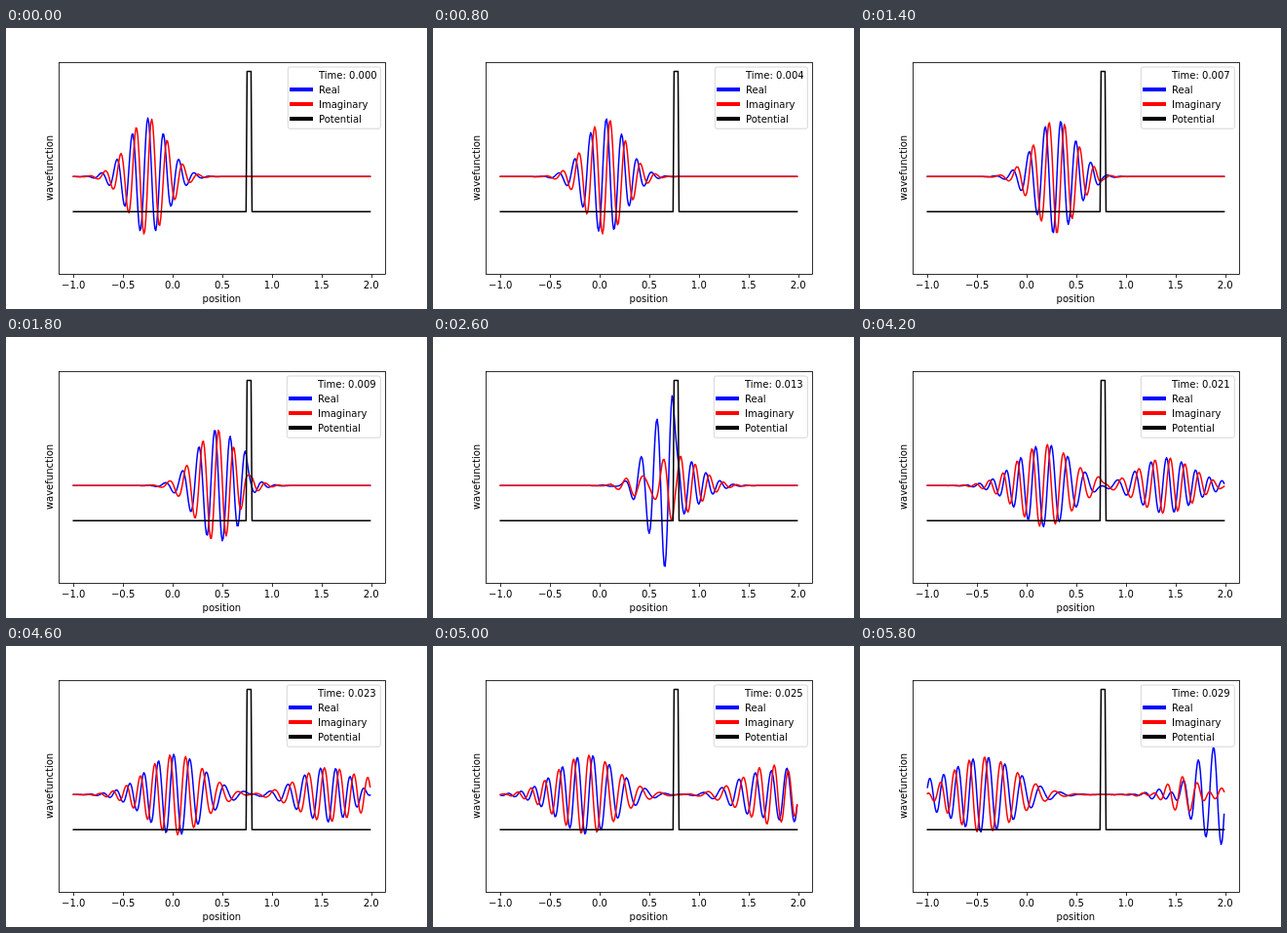
An HTML page that plays this animation: 432x288 px, repeating every 6000 ms.

```html
<!DOCTYPE html>
<html lang="en">
<head>
<meta charset="utf-8">
<title>Wave packet at a barrier</title>
<style>
  html, body { margin: 0; width: 100%; height: 100%; overflow: hidden; background: #fff; }
  svg { display: block; width: 432px; height: 288px; }
  text { font: 10px "DejaVu Sans", sans-serif; fill: #000; }
  .mid { text-anchor: middle; }
  .curve { fill: none; stroke-width: 1.5; stroke-linejoin: round; stroke-linecap: square; }
  .axis { fill: none; stroke: #000; stroke-width: .8; }
  .key { stroke-width: 4; stroke-linecap: square; }
  .blue { stroke: #00f; }
  .red { stroke: #f00; }
  .black { stroke: #000; }
</style>
</head>
<body>
<svg viewBox="0 0 432 288">
  <path class="axis" id="ticks"/>
  <g id="labels"></g>
  <text class="mid" x="221.4" y="281">position</text>
  <text class="mid" transform="translate(47.5 143.5) rotate(-90)">wavefunction</text>
  <path class="curve blue" id="real"/>
  <path class="curve red" id="imag"/>
  <path class="curve black" id="barrier"/>
  <rect class="axis" x="54.5" y="35.5" width="335" height="217"/>
  <rect id="box" y="40" height="63.2" rx="2" fill="#fff" fill-opacity=".8" stroke="#ccc" stroke-opacity=".8"/>
  <g id="legend">
    <text id="time" x="32" y="52"></text>
    <path class="key blue" d="M4 63h20"/>
    <text x="32" y="67">Real</text>
    <path class="key red" d="M4 78h20"/>
    <text x="32" y="82">Imaginary</text>
    <path class="key black" d="M4 93h20"/>
    <text x="32" y="97">Potential</text>
  </g>
</svg>
<script>
const $ = id => document.getElementById(id);

const N = 300, DX = 0.01;
const STEPS = 30, STEP_MS = 200;
const SUB = 100, DT = 0.001 / SUB;
const K = 40, START = -0.25, WIDTH = 0.2, HEIGHT = 2000;

const xs = Array.from({ length: N }, (_, i) => -1 + i * DX);
const V = xs.map((x, i) => i >= 175 && i < 180 ? HEIGHT : 0);

const px = x => 69.22 + (x + 1) * 101.8;
const trace = ys => 'M' + xs.map((x, i) => px(x).toFixed(2) + ' ' + ys[i].toFixed(2)).join('L');
const wave = a => trace(Array.from(a, v => 152.3 - 60 * v));

// a += s * H b, with H = -d2/dx2 + V and hard walls
function kick(a, b, s) {
  for (let i = 0; i < N; i++) {
    const left = i ? b[i - 1] : 0;
    const right = i < N - 1 ? b[i + 1] : 0;
    a[i] += s * ((2 * b[i] - left - right) / (DX * DX) + V[i] * b[i]);
  }
}

function solve() {
  const packet = f => Float64Array.from(xs, x => {
    const d = x - START;
    return Math.exp(-d * d / (2 * WIDTH * WIDTH)) * f(K * d);
  });
  const re = packet(Math.cos), im = packet(Math.sin);
  const out = [];
  for (let n = 0; n < STEPS; n++) {
    out.push({ real: wave(re), imag: wave(im) });
    for (let j = 0; j < SUB; j++) {
      kick(im, re, -DT / 2);
      kick(re, im, DT);
      kick(im, re, -DT / 2);
    }
  }
  return out;
}

function drawAxes() {
  let ticks = '';
  for (let v = -1; v <= 2; v += 0.5) {
    const x = px(v);
    ticks += `M${Math.round(x) + 0.5} 252.5v3.5`;
    const label = document.createElementNS('http://www.w3.org/2000/svg', 'text');
    label.setAttribute('class', 'mid');
    label.setAttribute('x', x);
    label.setAttribute('y', 267);
    label.textContent = v.toFixed(1).replace('-', '\u2212');
    $('labels').append(label);
  }
  $('ticks').setAttribute('d', ticks);
  $('barrier').setAttribute('d', trace(V.map(v => 188.3 - 143.9 * v / HEIGHT)));
}

const states = solve();
let shown = -1;

function show(n) {
  const left = n < 7 ? 289 : 288;
  $('real').setAttribute('d', states[n].real);
  $('imag').setAttribute('d', states[n].imag);
  $('time').textContent = 'Time: ' + (n / 1000).toFixed(3);
  $('legend').setAttribute('transform', `translate(${left})`);
  $('box').setAttribute('x', left + 0.3);
  $('box').setAttribute('width', 384 - left);
}

function tick() {
  const n = Math.floor(performance.now() / STEP_MS) % STEPS;
  if (n !== shown) show(shown = n);
  requestAnimationFrame(tick);
}

drawAxes();
tick();
</script>
</body>
</html>
```
